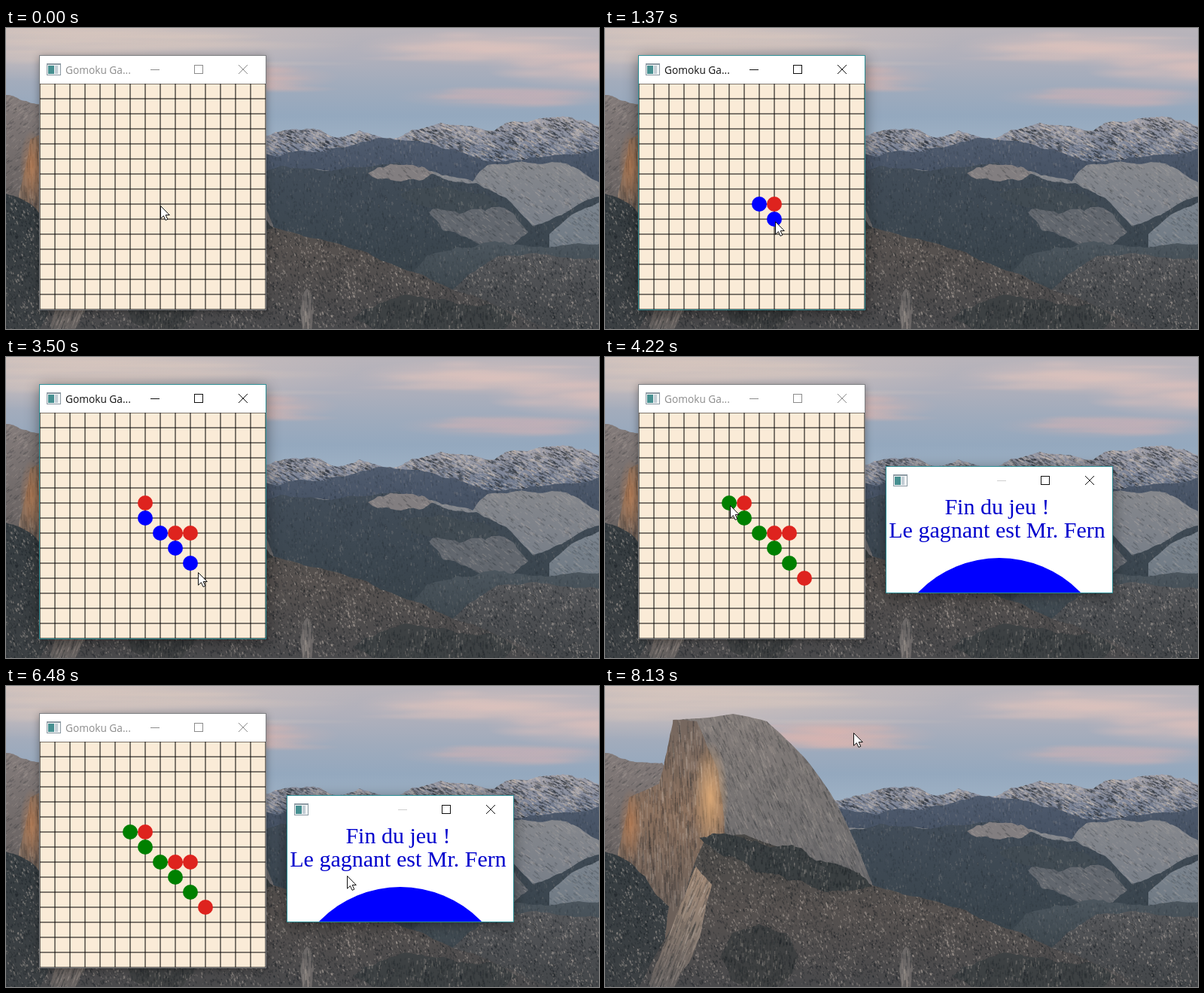
An HTML page with a canvas that plays this animation: 788 by 400 pixels, repeating every 8.63 s.

```html
<!DOCTYPE html>
<html lang="fr">
<head>
<meta charset="utf-8">
<title>Gomoku</title>
<style>
html, body { margin: 0; width: 100%; height: 100%; overflow: hidden; }
canvas { display: block; }
</style>
</head>
<body>
<canvas id="stage" width="788" height="400"></canvas>
<script>
const W = 788, H = 400, LOOP = 8630;
const stage = document.getElementById('stage').getContext('2d');

const clamp = v => Math.max(0, Math.min(1, v));
const ease = u => u * u * (3 - 2 * u);

// ---------- landscape, painted once ----------
const scenery = document.createElement('canvas');
scenery.width = W;
scenery.height = H;
const land = scenery.getContext('2d');

let seed = 7;
const random = () => (seed = (seed * 16807) % 2147483647) / 2147483647;
const spread = r => (random() + random() - 1) * r;

function vertical(y0, y1, colors) {
  const g = land.createLinearGradient(0, y0, 0, y1);
  colors.forEach((c, i) => g.addColorStop(colors.length > 1 ? i / (colors.length - 1) : 0, c));
  return g;
}

function glow(x, y, rx, ry, rgb, alpha) {
  land.save();
  land.translate(x, y);
  land.scale(rx, ry);
  const g = land.createRadialGradient(0, 0, 0, 0, 0, 1);
  g.addColorStop(0, `rgba(${rgb},${alpha})`);
  g.addColorStop(1, `rgba(${rgb},0)`);
  land.fillStyle = g;
  land.fillRect(-1, -1, 2, 2);
  land.restore();
}

// A cloud is a soft body streaked with thin wisps.
function cloud(x, y, rx, ry, rgb) {
  glow(x, y, rx * 1.1, ry * 1.4, rgb, 0.75);
  for (let i = 0; i < 24; i++) {
    glow(x + spread(rx * 0.8), y + spread(ry), rx * (0.2 + random() * 0.4), 3 + random() * 5, rgb, 0.4);
  }
}

// Splits a segment at displaced midpoints, like a fractal coastline.
function crag(path, [x0, y0], [x1, y1], rough) {
  const length = Math.hypot(x1 - x0, y1 - y0);
  if (length < 4) return path.lineTo(x1, y1);
  const mid = [(x0 + x1) / 2 + spread(length * rough * 0.5), (y0 + y1) / 2 + spread(length * rough)];
  crag(path, [x0, y0], mid, rough);
  crag(path, mid, [x1, y1], rough);
}

// Clumped short strokes; light is the share of pale ones.
function weather(path, [x0, y0, x1, y1], { density = 0.04, dx = 1, dy = 4, contrast = 0.25, light = 0.45 }) {
  land.save();
  land.clip(path);
  for (let i = (x1 - x0) * (y1 - y0) * density; i > 0; i--) {
    const x = x0 + random() * (x1 - x0), y = y0 + random() * (y1 - y0), k = 0.3 + random();
    const clump = 0.22 * Math.sin(x * 0.09 + 2 * Math.sin(y * 0.07 + x * 0.02));
    const pale = random() + clump < light;
    land.strokeStyle = `rgba(${pale ? '205,192,182' : '20,26,31'},${contrast * (0.5 + random() * 0.7)})`;
    land.lineWidth = 0.7 + random() * 1.3;
    land.beginPath();
    land.moveTo(x, y);
    land.lineTo(x + dx * k, y + dy * k);
    land.stroke();
  }
  land.restore();
}

const pairs = text => text.split(' ').map(p => p.split(',').map(Number));

// A skyline through a few points, filled down to the bottom edge.
function ridge(skyline, depth, colors, look = {}) {
  const points = pairs(skyline), path = new Path2D();
  const xs = points.map(p => p[0]), top = Math.min(...points.map(p => p[1]));
  path.moveTo(...points[0]);
  points.slice(1).forEach((p, i) => crag(path, points[i], p, look.rough ?? 0.1));
  path.lineTo(xs[xs.length - 1], H);
  path.lineTo(xs[0], H);
  land.fillStyle = vertical(top, top + depth, colors);
  land.fill(path);
  weather(path, [Math.min(...xs), top, Math.max(...xs), Math.min(H, top + depth)], look);
}

// A ragged ellipse: outcrops and groves.
function patch(x, y, rx, ry, color, look = {}, tilt = 0) {
  const path = new Path2D(), at = i => {
    const a = i * Math.PI / 4, px = Math.cos(a) * rx;
    return [x + px, y + Math.sin(a) * ry + px * tilt];
  };
  path.moveTo(...at(0));
  for (let i = 0; i < 8; i++) crag(path, at(i), at(i + 1), 0.18);
  land.fillStyle = color;
  land.fill(path);
  const reach = ry + rx * Math.abs(tilt);
  weather(path, [x - rx, y - reach, x + rx, y + reach], look);
}

function paintLandscape() {
  const forest = { density: 0.06, dx: 0.4, dy: 4, contrast: 0.13, light: 0.3 };
  const granite = { density: 0.045, dx: 5, dy: 4, contrast: 0.17, light: 0.5 };
  const cliff = { density: 0.05, dx: 0.5, dy: 16, contrast: 0.2, light: 0.4 };
  const scrub = { density: 0.09, dx: 1, dy: 3, contrast: 0.34, light: 0.36 };
  const grove = { density: 0.09, dx: 0, dy: 5, contrast: 0.25, light: 0.22 };

  land.fillStyle = vertical(0, 155, ['#b9b4ba', '#b0b0bb', '#a0abbc', '#94a8be', '#9fb2c5']);
  land.fillRect(0, 0, W, H);
  cloud(110, 14, 330, 42, '217,199,190');
  cloud(300, 66, 130, 16, '216,181,176');
  cloud(640, 26, 160, 18, '219,194,189');
  cloud(780, 52, 130, 22, '217,191,187');
  cloud(670, 92, 140, 12, '193,176,182');

  // snowy range, blue hills, forested valley
  ridge('300,150 404,134 440,146 470,136 520,146 597,129 650,136 740,117 788,131', 60,
    ['#a09fa9', '#868c9d', '#66738a'], { density: 0.16, dx: 6, dy: 3, contrast: 0.38, light: 0.52, rough: 0.14 });
  ridge('300,160 420,165 500,146 580,160 640,177 788,160', 50, ['#505c6f', '#465264'], forest);
  ridge('300,190 430,190 520,179 620,204 640,182 690,178 745,180 788,205', 100,
    ['#85878c', '#777e88'], granite);
  ridge('300,190 430,190 520,179 625,206 665,226 700,263 788,224', 210,
    ['#424d59', '#3b464f', '#353f45'], forest);
  patch(525, 193, 44, 11, '#827e80', granite);
  patch(628, 258, 66, 29, '#62676e', granite, 0.2);
  patch(590, 228, 66, 15, '#414b53', forest, 0.1);
  ridge('722,274 752,248 788,232', 70, ['#7c858f', '#6d7781'], granite);
  ridge('540,325 560,302 600,291 700,291 788,287', 60, ['#4c565e', '#3d474e'], forest);
  ridge('580,356 655,303 705,299 788,308', 100, ['#56575a', '#434649'], scrub);

  // left peak and great dome
  ridge('0,89 40,101 76,102 90,135', 140, ['#837b7a', '#686261'], { ...granite, dx: -5 });
  ridge('90,45 125,43 170,37 215,47 264,94 300,143 328,198 355,262', 215,
    ['#837c79', '#787473', '#6c6b6d'], { density: 0.06, dx: 4, dy: 9, contrast: 0.15, rough: 0.03 });
  ridge('17,222 32,148 72,130 91,45 122,47 150,112 160,205', 245,
    ['#75675f', '#8b705d', '#6c6059'], { ...cliff, rough: 0.05 });
  glow(140, 148, 24, 75, '226,173,120', 0.9);
  glow(34, 185, 16, 50, '190,125,80', 0.7);

  // foreground slope
  ridge('0,220 20,227 85,293 80,330', 180, ['#363d41', '#3c4043'], scrub);
  ridge('45,400 90,318 118,238 134,202 185,197 260,228 308,240 356,265 520,317 620,355 720,400', 200,
    ['#494846', '#56514f', '#49494b'], { ...scrub, rough: 0.06 });
  patch(240, 234, 115, 22, '#3a3f41', grove, 0.28);
  patch(205, 360, 52, 44, '#3e4041', grove);
  patch(570, 386, 110, 25, '#3d4143', grove);
  ridge('60,392 92,312 121,240 142,264 128,326 92,400', 160,
    ['#a58c78', '#8b7c71', '#625e5d'], { ...cliff, dx: -6 });
  patch(400, 378, 9, 32, '#6d6968', cliff);
}

// ---------- interface ----------
const MAIN = { x: 45, y: 37, w: 300, h: 337 };
const POPUP = { x: 374, y: 146, w: 300, h: 167 };
const CELL = 20, BOARD_TOP = MAIN.y + 37;
const POPUP_CLOSED = 6960, MAIN_CLOSED = 7770, OPENING = 210, CLOSING = 150;

// Blue plays along the diagonal, red answers every other click.
const clicks = [530, 860, 1340, 1760, 2180, 2600, 3050, 3590, 3950];
const blue = [8, 9, 10, 7, 6].map(n => [n, n - (n > 6 ? 0 : 0)]);
const red = [[9, 8], [10, 8], [7, 6], [11, 11]];
const moves = clicks.map((time, i) => {
  const [col, row] = (i % 2 ? red : blue)[i >> 1];
  return { time, player: i % 2 ? 'red' : 'blue', x: MAIN.x + col * CELL, y: BOARD_TOP + row * CELL };
});
const WIN = clicks[clicks.length - 1];

// Pointer stops: arrival time, place, and rest before leaving.
const stop = (time, x, y, rest = 0) => ({ time, x, y, rest });
const route = [
  stop(0, 205, 236, 500),
  ...moves.map((m, i) => stop(m.time, m.x + (i ? 1 : 0), m.y + (i ? 3 : 2), m.time === WIN ? 1240 : 150)),
  stop(2360, 219, 258),
  stop(6270, 444, 262, 120), stop(6480, 453, 252),
  stop(6840, 644, 165, 120), stop(7350, 287, 194),
  stop(7680, 316, 58, 90), stop(8130, 330, 62, 500)
].sort((a, b) => a.time - b.time);

function pointerAt(t) {
  const next = route.findIndex(s => s.time > t);
  if (next < 0) return [330, 62];
  const a = route[next - 1], b = route[next], leave = a.time + a.rest;
  const u = t <= leave ? 0 : ease(clamp((t - leave) / (b.time - leave)));
  return [Math.round(a.x + (b.x - a.x) * u), Math.round(a.y + (b.y - a.y) * u)];
}

function line(x0, y0, x1, y1) {
  stage.moveTo(x0, y0);
  stage.lineTo(x1, y1);
}

function disc(x, y, r, color) {
  stage.fillStyle = color;
  stage.beginPath();
  stage.arc(x, y, r, 0, Math.PI * 2);
  stage.fill();
}

function box(color, x, y, w, h) {
  stage.fillStyle = color;
  stage.fillRect(x, y, w, h);
}

function windowIcon(x, y) {
  box('#8d9aa3', x, y, 19, 16);
  box('#f3f6f7', x + 1, y + 2, 17, 13);
  box('#468f90', x + 2, y + 3, 8, 11);
  box('#c3ced5', x + 11, y + 3, 4, 11);
}

function titleButtons(x, y, color, minColor) {
  stage.lineWidth = 1;
  stage.strokeStyle = minColor;
  stage.beginPath();
  line(x + 147, y + 18.5, x + 159, y + 18.5);
  stage.stroke();
  stage.strokeStyle = color;
  stage.strokeRect(x + 205.5, y + 12.5, 11, 11);
  stage.beginPath();
  line(x + 264, y + 12, x + 276, y + 24);
  line(x + 276, y + 12, x + 264, y + 24);
  stage.stroke();
}

function drawWindow({ x, y, w, h }, presence, active, title, minColor, content) {
  if (presence <= 0) return;
  const scale = 0.9 + 0.1 * presence, cx = x + w / 2, cy = y + h / 2;
  stage.save();
  stage.globalAlpha = presence;
  stage.translate(cx, cy);
  stage.scale(scale, scale);
  stage.translate(-cx, -cy);

  stage.save();
  stage.shadowColor = active ? 'rgba(0,0,0,.45)' : 'rgba(0,0,0,.35)';
  stage.shadowBlur = active ? 18 : 10;
  stage.shadowOffsetY = active ? 4 : 2;
  box(active ? '#2f9097' : '#7d7f82', x - 1, y - 1, w + 2, h + 2);
  stage.restore();

  const ink = active ? '#111' : '#8c8c8c';
  box('#fff', x, y, w, h);
  windowIcon(x + 9, y + 10);
  stage.fillStyle = ink;
  stage.font = '13.7px "Open Sans", "Noto Sans", sans-serif';
  stage.textAlign = 'left';
  stage.fillText(title, x + 34, y + 24);
  titleButtons(x, y, ink, minColor || ink);

  stage.beginPath();
  stage.rect(x, y + 37, w, h - 37);
  stage.clip();
  content();
  stage.restore();
}

function board(t) {
  const { x, w } = MAIN;
  box('#faebd7', x, BOARD_TOP, w, w);
  stage.strokeStyle = '#000';
  stage.lineWidth = 1;
  stage.beginPath();
  for (let d = 0; d <= w; d += CELL) {
    line(x + d, BOARD_TOP, x + d, BOARD_TOP + w);
    line(x, BOARD_TOP + d, x + w, BOARD_TOP + d);
  }
  stage.stroke();
  const colors = { red: '#de231e', blue: t < WIN ? '#0000ff' : '#008000' };
  moves.filter(m => t >= m.time).forEach(m => disc(m.x, m.y, 10, colors[m.player]));
}

function verdict() {
  disc(524, 417, 150, '#0000ff');
  stage.fillStyle = '#0000cd';
  stage.font = '30px "Liberation Serif", "Times New Roman", serif';
  stage.textAlign = 'center';
  stage.fillText('Fin du jeu !', 521, 209);
  stage.fillText('Le gagnant est Mr. Fern', 521, 240);
}

const arrow = new Path2D('M.5 .5V17.2L4.4 13.6L7 19.4L9.8 18.2L7.2 12.5H12.3Z');

function pointer(x, y) {
  stage.save();
  stage.translate(x, y);
  stage.fillStyle = '#fff';
  stage.fill(arrow);
  stage.strokeStyle = '#111';
  stage.lineWidth = 1;
  stage.stroke(arrow);
  stage.restore();
}

function draw(time) {
  // Motion advances in 30 ms ticks, realigned after each long pause.
  const base = time < 500 ? 0 : time < 5220 ? 500 : 5220;
  const t = base + Math.floor((time - base) / 30) * 30;
  const closing = since => 1 - ease(clamp((t - since) / CLOSING));
  const popupShown = ease(clamp((t - WIN) / OPENING)) * closing(POPUP_CLOSED);
  const mainActive = t >= clicks[0] && t < WIN || t >= POPUP_CLOSED;

  stage.drawImage(scenery, 0, 0);
  drawWindow(MAIN, closing(MAIN_CLOSED), mainActive, 'Gomoku Ga...', null, () => board(t));
  drawWindow(POPUP, popupShown, true, '', '#cfcfcf', verdict);
  pointer(...pointerAt(t));
}

paintLandscape();
const start = performance.now();
function tick() {
  draw((performance.now() - start) % LOOP);
  requestAnimationFrame(tick);
}
tick();
</script>
</body>
</html>
```
